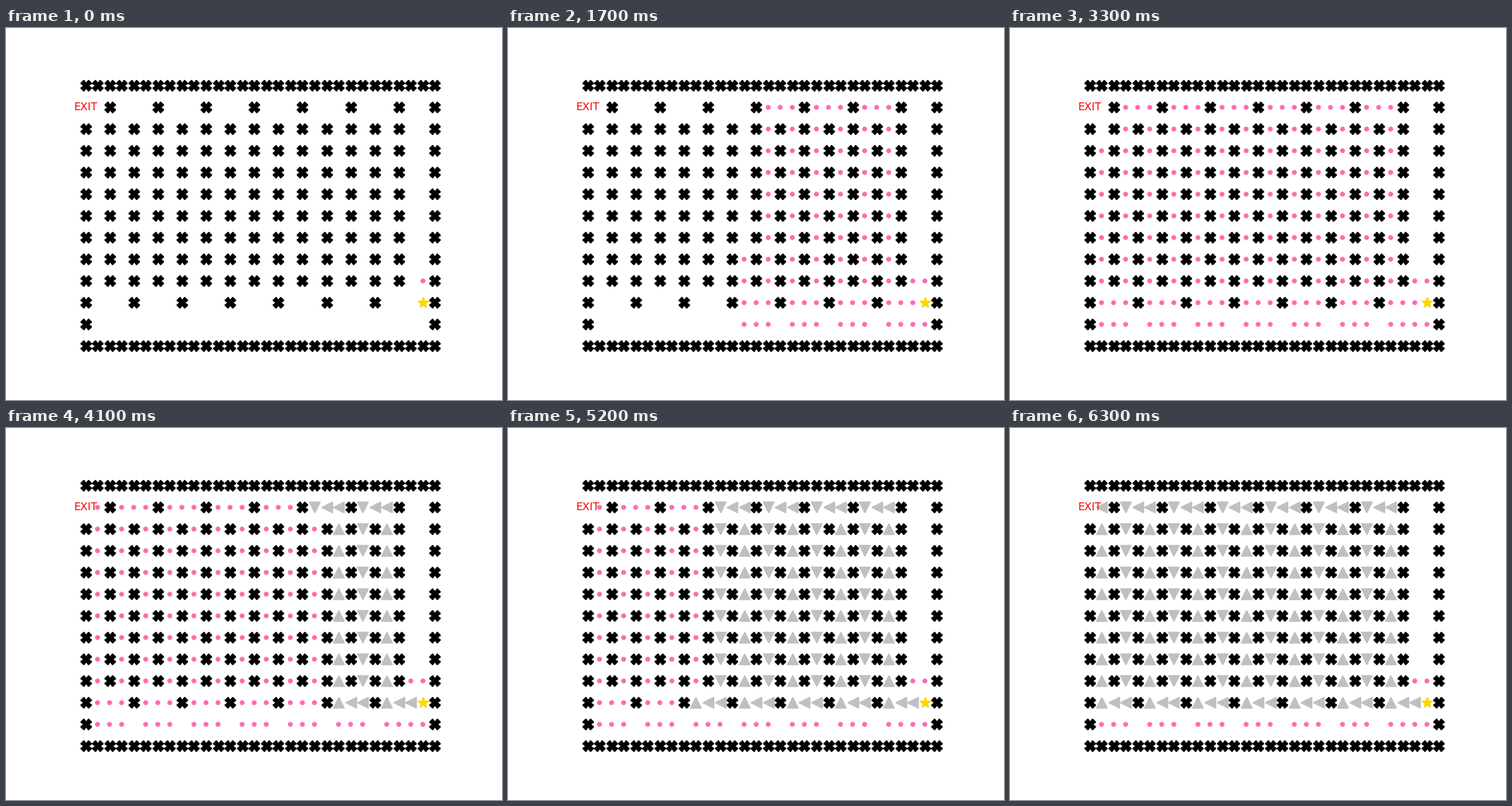
Animation of 640x480 px, one loop 6400 ms. Source, as a matplotlib script:

```python
import matplotlib.pyplot as plt
from matplotlib.animation import FuncAnimation

COLS, ROWS = 30, 13
START, EXIT = (28, 10), (0, 1)
FRAMES, INTERVAL = 64, 100
STEPS_PER_FRAME = 5
PAUSE = 2  # steps between reaching the exit and tracing the route
MOVES = [(0, -1), (0, 1), (-1, 0), (1, 0)]
ARROWS = {(0, -1): "^", (0, 1): "v", (-1, 0): "<"}


def build_walls():
    walls = {(x, y) for x in range(COLS) for y in (0, ROWS - 1)}
    walls |= {(x, y) for x in (0, COLS - 1) for y in range(ROWS)}
    for x in range(2, 27, 2):
        top = 1 if x % 4 == 2 else 2
        walls |= {(x, y) for y in range(top, top + 9)}
    return walls - {EXIT}


def distance(cell):
    return abs(cell[0] - EXIT[0]) + abs(cell[1] - EXIT[1])


def search(walls):
    """Greedy walk: note every fresh neighbour, step to the one nearest the exit."""
    seen, route = [START], [START]
    while route[-1] != EXIT:
        x, y = route[-1]
        near = [(x + dx, y + dy) for dx, dy in MOVES]
        fresh = [c for c in near if c not in walls and c not in seen]
        seen += fresh
        route.append(min(fresh, key=lambda c: (distance(c), c[0])))
    return [c for c in seen if c not in (START, EXIT)], route


walls = build_walls()
dots, route = search(walls)
trail = [(cell, ARROWS[nxt[0] - cell[0], nxt[1] - cell[1]])
         for cell, nxt in zip(route[1:], route[2:])]

fig, ax = plt.subplots(figsize=(6.4, 4.8), dpi=100)
ax.set_xlim(-1.45, COLS + 0.45)
ax.set_ylim(ROWS - 0.4, -0.6)
ax.axis("off")

ax.plot(*zip(*sorted(walls)), "X", color="black", ms=10)
ax.plot(*START, "*", color="gold", ms=10)
ax.text(*EXIT, "EXIT", color="red", ha="center", va="center")
seen_dots = ax.scatter(*zip(*dots), s=50, marker=".", c=["hotpink"] * len(dots))
arrows = {m: ax.plot([], [], m, color="silver", ms=10)[0] for m in ARROWS.values()}


def draw(frame):
    step = STEPS_PER_FRAME * frame + 1
    seen_dots.set_offsets(dots[:step])
    shown = trail[:max(0, step - len(dots) - PAUSE)]
    for mark, line in arrows.items():
        cells = [cell for cell, m in shown if m == mark]
        line.set_data([x for x, _ in cells], [y for _, y in cells])
    return [seen_dots, *arrows.values()]


anim = FuncAnimation(fig, draw, frames=FRAMES, interval=INTERVAL,
                     repeat=True, repeat_delay=0)
plt.show()
```
